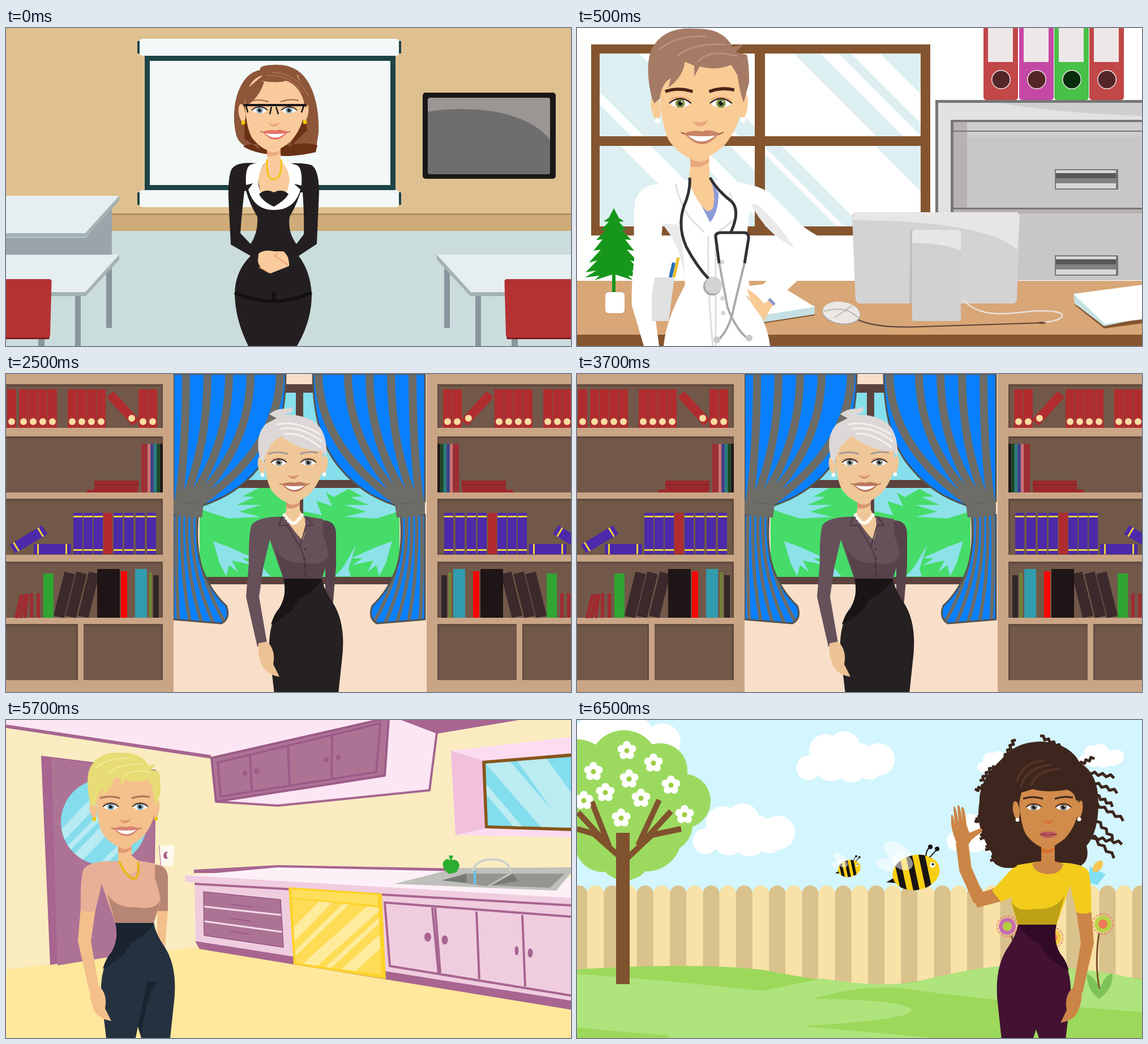
Recreate the animation shown at these times as an HTML page. Size 998 by 561 pixels, loop 8 s.

```html
<!DOCTYPE html>
<html lang="en">
<meta charset="utf-8">
<title>Five characters</title>
<style>
html, body { margin: 0; height: 100%; overflow: hidden; }
svg { display: block; width: 100vw; height: 100vh; }
</style>
<svg id="stage" viewBox="0 0 998 561" preserveAspectRatio="none"></svg>
<script>
const each = (list, f) => list.map(f).join('');
const times = (n, f) => each([...Array(n).keys()], f);
const O = (fill, x, y, rx, ry = rx, turn = 0) => `<ellipse fill="${fill}" cx="${x}" cy="${y}" rx="${rx}" ry="${ry}" transform="rotate(${turn} ${x} ${y})"/>`;
const move = (how, s) => `<g transform="${how}">${s}</g>`;
const flip = (axis, s) => move(`matrix(-1 0 0 1 ${axis} 0)`, s);
let clips = 0;
const clip = (d, s) => `<clipPath id="c${++clips}"><path d="${d}"/></clipPath><g clip-path="url(#c${clips})">${s}</g>`;

// One shape per line: "color path", "color/width path", r = rect, o = ellipse, d = dots of one radius.
function shape(line) {
  if (line[0] === '<') return line;
  const [color, ...rest] = line.split(' '), [fill, width] = color.split('/'), [kind, ...n] = rest;
  if (kind === 'o') return O(fill, ...n);
  if (kind === 'd') return each(n.slice(1), (x, i, a) => i % 2 ? '' : O(fill, x, a[i + 1], n[0]));
  if (kind === 'r') return `<rect fill="${fill}" x="${n[0]}" y="${n[1]}" width="${n[2]}" height="${n[3]}" rx="${n[4] || 0}"/>`;
  const style = width ? `fill="none" stroke="${fill}" stroke-width="${width}" stroke-linejoin="round"` : `fill="${fill}" fill-rule="evenodd"`;
  return `<path ${style} d="${rest.join(' ')}"/>`;
}
const paint = s => each(s.split('\n').filter(Boolean), shape);

const eye = (x, y, iris) => clip(`M${x - 14} ${y}q14 -11 28 0q-14 11 -28 0`, paint(`
#fff r ${x - 14} ${y - 6} 28 12
${iris} o ${x} ${y} 6
#17191c o ${x} ${y} 3
#fff o ${x + 2} ${y - 2} 1`)) + paint(`#33221f/1.7 M${x - 14} ${y}q14 -12 28 0`);

const head = (skin, shade, lip, iris, brow, ring, browWidth = 3, shut) => paint(`
${skin} M198 205h24v46h-24Z
${shade} M198 223q12 9 24 0v5q-12 9 -24 5Z
${skin} o 154 158 6 16 -8
${skin} o 266 157 5 16 8
${ring} d 3.5 156 175 265 174
${skin} M159 135Q166 95 193 91H252Q262 110 264 150Q263 182 240 208Q217 226 207 226Q187 222 171 201Q160 180 159 135Z
${brow}/${browWidth} M166 138q16 -6 35 0M222 138q16 -6 32 -2
${shade}/1.5 M172 148q13 -6 26 1M224 148q13 -6 26 1
${eye(185, 153, iris)}
${eye(237, 153, iris)}
${shade} M200 175q11 5 21 -1q-5 9 -10 8q-6 1 -11 -7Z
${shut ? paint(`
${lip} M195 200q10 -7 15 -3q6 -4 16 3q-5 7 -16 7q-11 0 -15 -7Z
#8d3942/1.3 M195 200q15 3 31 0`) : paint(`
#8b4b35/1.3 M186 190q27 13 54 0
${lip} M190 191q15 -5 23 -2q7 -4 22 2q-22 28 -45 0Z
#fff M195 194q18 2 35 0q-18 15 -35 0Z`)}`);

const shortHair = (dark, light) => paint(`
${dark} M149 147Q139 104 149 83Q165 54 206 58Q239 57 252 81L265 78L256 88L270 91Q273 103 273 126L266 152Q261 139 258 117L250 104Q231 112 210 106L203 119V105L191 100Q189 119 170 133L173 121Q161 128 159 147L152 153Z
${light}/2 M158 85Q180 65 219 68M181 93Q201 76 243 78M207 101Q220 83 258 93`);

const hand = 'M149 472L164 469Q180 483 175 509L186 531Q159 527 153 505Q147 490 149 472Z';
const figure = (skin, top, dark, low, lowDark, long, back = true) => paint(`
${back ? paint(`
${dark} M262 255Q288 255 286 284V337H264Z
${long ? dark : skin} M267 337H286L280 409L267 391Z`) : ''}
${long ? top : skin} M132 330L158 334L150 390L164 471L147 478L127 390Z
${top} M198 249Q150 247 137 263Q131 278 132 336Q145 341 158 336L169 289Q181 325 193 358H261L273 320Q270 295 263 280V253L227 247Z
${dark} M179 307Q195 333 229 330Q263 337 273 317L261 358H193Z
${low} M193 358H261Q264 377 280 400Q305 438 296 505L290 561H177L168 485Q166 440 186 410Q200 387 193 358Z
${lowDark} M194 358H261Q250 379 219 395Q211 419 171 439Q177 419 186 410Q200 387 194 358Z
${skin} ${hand}`);

function classroom() {
  const table = y => paint(`
#e6eef2 M-40 ${y}H200l-60 66H-40Z
#a4b2b3 M-40 ${y + 66}H140l60 -66v9l-59 64H-40Z`);
  const seat = paint(`
#87959c r 122 473 10 88
#87959c r 177 422 10 107
${table(400)}
#87959c r 57 546 11 15
#7e1c20 M-40 540H78L76 549H-40Z
#b53233 M-40 443H76Q81 443 80.500 448L78 541Q78 546 73 546H-40Z`);
  const roll = y => paint(`
#1d4347 r 232 ${y + 4} 466 22
#f2f9f8 r 236 ${y} 458 30 5`);
  return paint(`
#dfc091 r 0 0 998 561
#cfab79 r 0 328 998 30
#a47c50 r 187 327.5 811 2
#cbdcdc r 0 358 998 203
#1d4347 r 245 45 443 243
#f2f9f8 r 254 58 425 219
${roll(19)}
${roll(286)}
#191818 r 736 114 235 152 5
#6f6e6e r 745 123 216 135 4
#9b9594 M748 123H958L961 126V197C932 160 872 143 805 143Q770 143 745 148V126Z
#99a5ab M0 370H141L187 317V400H0Z
${table(296)}
${seat}
${flip(961, seat)}
#8d5639 M449 74Q446 66 472 65Q500 63 519 78C546 100 554 150 552 185L547 219Q500 229 478 224C440 222 412 208 407 190C400 165 402 130 412 108Q425 78 449 74Z
#6a3114 M419 209Q430 202 460 207H500Q530 200 550 207L547 219Q500 229 478 224Q440 222 419 209ZM421 140V195L448 214ZM526 140L532 180L500 212Z
${move('translate(263 -8)', head('#f9cb9c', '#efaa7f', '#e77365', '#82a7b4', '#a2673d', '#f7c600', 2))}
#8d5639 M450 93Q480 98 495 93Q522 103 529 141L538 130L512 80H458L420 112L424 138Q448 122 456 95Z
#a96c4b/2 M459 84Q500 80 524 114M470 78Q512 80 534 119
#171516/4 M420 136H530
#171516/2.5 M424 137l3 12M469 139l-3 13M477 139l4 13M526 137l-4 12
#231f20 M432 238Q405 237 398 250Q392 265 393 300L397 382L432 402Q404 430 404 470Q405 515 428 561H514Q540 517 540 470Q538 430 517 402L549 381L553 290Q553 251 540 242Q525 237 500 239H449ZM421 288Q416 330 414 362L432 381Q446 360 444 333Q430 310 424 287ZM524 290Q527 330 526 364L513 381Q497 360 501 333Q514 310 520 290Z
#f9cb9c M462 230H484L502 250L500 296H450L444 260Z
#fff M461 233L432 241Q422 246 424 277L436 274L428 285Q438 321 473 321Q510 321 520 285L509 275L522 278Q524 247 514 242L486 234Q504 255 500 275Q494 304 473 315Q452 305 446 278Q443 254 461 233Z
#231f20 M447 293Q459 282 473 290Q488 282 499 293Q492 305 473 315Q453 306 447 293Z
#f3c512/3 M461 232Q459 267 473 267Q488 266 486 232
#121011/6 M404 467Q470 497 540 467M473 467v12
#f9cb9c M446 398Q456 390 474 394H490Q501 403 500 420L467 433Q447 426 445 411Z
#ee9c6e/1.8 M475 402l23 16M447 422l15 8M480 397l-6 6`);
}

function clinic() {
  const pane = (x, y, w, h, bands) => paint(`
#fff r ${x} ${y} ${w} ${h}
${clip(`M${x} ${y}h${w}v${h}h${-w}Z`, each(bands, ([a, b]) => paint(`#ddeff1 M${x + a} ${y}h${b - a}l200 200h${a - b}Z`)))}`);
  const binder = (x, color, hole) => paint(`
${color} r ${x} -6 61 133 5
#ede7e8 r ${x + 8} 0 44 60
#ede7e8 o ${x + 31} 91 17
${hole} o ${x + 31} 91 15.5`);
  const handle = y => paint(`
#767676 r 844 ${y} 112 36
#d8d8d8 r 846 ${y + 2} 106 32
#5b5656 r 846 ${y + 7} 106 9
#858282 r 846 ${y + 16} 106 9`);
  const branch = paint('#17961c M65 318L56 335L47 341L56 342L42 357L51 356L34 374L45 373L29 393L42 391L21 414L36 410L15 431L34 428L14 440L40 437L31 445L62 435V466H65Z');
  return paint(`
#fff r 0 0 998 561
#84552f r 25 29 599 337
${pane(40, 45, 274, 146, [[-145, -90], [-68, 70], [100, 145]])}
${pane(332, 45, 275, 146, [[51, 98], [130, 152], [203, 290]])}
${pane(40, 208, 274, 142, [[-140, 37], [90, 150], [180, 230]])}
${pane(332, 208, 275, 142, [[-75, -15], [-2, 30], [195, 275]])}
#d8a677 r 0 446 998 95
#84552f r 0 541 998 20
#777 r 633 127 365 318
#e3e1e1 r 638 132 360 313
#cfcfcf M745 132H998V155Q850 150 745 132Z
#777 r 660 162 338 283
#b9b1b1 r 665 166 333 279
#d0cfcf M689 166H998V445H689Z
#777 r 665 181 333 2
#c7c7c7 r 689 192 309 253
#777 r 665 317 333 3
#b9b1b1 r 665 320 333 7
${handle(249)}
${handle(401)}
${binder(718, '#c24747', '#542628')}
${binder(781, '#c548a6', '#542628')}
${binder(843, '#48c148', '#082d0c')}
${binder(905, '#c24747', '#542628')}
#d3d3d4 M490 325H777L782 330L777 482L772 486H497L492 481L486 330Z
#e7e6e6 M490 325H777L782 330L778 391Q720 340 487 339Z
#bdbdbe M589 356H596V486H587Z
#d0d0d1 r 592 356 86 161 4
#e7e6e6 M595 356H675L678 359V393Q650 380 592 379V359Z
#e5e1de/2.5 M679 476C715 520 775 499 820 499Q861 499 857 509Q850 518 820 519
#584337/2 M497 515Q530 530 605 527L825 520
#715033 o 821 520 7 2
#aaa5a2 o 467 503 34 20 8
#ebe7e4 o 467 502 33 19 8
#aaa/1.5 M436 500Q475 488 497 512M455 511L487 489
#84552f M877 487L931 530L998 521V510H925Z
#c5e0e3 M877 468L998 500V512L931 526L879 486Z
#fff M877 469L998 453V514L932 522Z
#84552f M328 517L420 502V507L330 521Z
#c5e0e3 M420 490V505L330 519L310 505Z
#fff M290 457L350 449L420 492L325 507Z
${branch}
${flip(130, branch)}
#fff r 50 466 34 37 6
${move('translate(-74 -79) scale(1.385)', head('#f9cb95', '#e9a77d', '#c98468', '#7c913d', '#4a2418', '#fff', 4) + shortHair('#a67b66', '#bb927c'))}
#fff M203 267L150 275Q108 275 102 310Q99 350 102 400Q95 455 97 490L118 561H145L133 470Q148 400 151 345L178 347Q197 410 190 455Q157 515 153 561H341Q335 510 300 475L306 461L295 400L307 310Q350 364 384 387L321 462L345 487L389 446L424 366Q385 345 330 285Q305 272 240 268Z
#eaeaea M307 310L320 312Q355 345 384 387Q335 365 307 310ZM152 347L179 347Q189 380 190 445Q185 395 165 365Z
#2370b7/6 M165 440L171 414
#e8bd27/5 M171 440L179 405
#dfe1e2 M137 440H172L162 517H132V472Z
#f9cb95 M300 460Q318 470 330 486L344 478L350 486Q337 498 332 517Q316 498 308 485Z
#8796d0/5 M339 478L349 488
#8b9cda M198 270L235 343Q250 325 250 292L236 265Z
#f9cb95 M200 245H234V262Q247 295 240 318Q234 325 228 322Q210 305 197 270Z
#dedede/3 M174 275Q180 305 199 335L224 360M270 290L281 336L241 366M232 367Q230 460 240 561M245 369V561
#d6d6d6 d 4 256 413 257 477 258 503
#313136/5 M199 264Q201 286 189 314Q177 350 193 386Q211 420 233 443M235 264Q248 287 273 306Q289 322 272 360
#aaa/4 M251 414L266 493Q280 530 299 546M296 414L277 493Q270 530 250 550
#313136/5 M251 415L245 369Q244 361 255 361H295Q304 361 303 372L296 415
#a5a5a5 o 239 456 16
#d3d3d3 o 241 454 15
#c9c9c9 d 6 247 550 304 547`);
}

function library() {
  const red = (x, y = 27) => paint(`
#b12c2e r ${x} ${y} 16 68
#f8dda1 o ${x + 8} ${y + 57} 6`);
  const blue = x => paint(`
#4c2aa9 r ${x} 245 16 73
#efd438 r ${x} 250 16 3
#efd438 r ${x} 309 16 3`);
  const lying = how => move(how, paint(`
#4c2aa9 r 0 0 66 18
#efd438 r 6 0 3 18
#efd438 r 56 0 3 18`));
  const lean = (x, y, turn, w, h, color) => move(`translate(${x} ${y}) rotate(${turn})`, paint(`${color} r 0 ${-h} ${w} ${h}`));
  const space = (x, y, w, h) => paint(`
#624b3e r ${x} ${y} ${w} ${h}
#715849 r ${x} ${y + 4} ${w - 3} ${h - 4}`);
  const shelf = paint(`
#c9a586 r -50 0 346 561
${space(-50, 18, 327, 77)}
${each([110, 220, 331], y => space(-50, y, 327, 99))}
${space(-50, 441, 177, 99)}
${space(137, 441, 140, 99)}
${each([2, 23, 40, 57, 74, 109, 126, 143, 160, 234, 251], x => red(x))}
${move('translate(178 41) rotate(-42)', red(0, 0))}
${each(['#a12c32', '#a12c32', '#c97175', '#3b408e', '#267f82', '#174926', '#201919'], (c, i) => paint(`${c} r ${239 + i * 5.500} 123 5 86`))}
#9c282c r 156 188 78 16
#711d23 r 156 195 78 1
#9c282c r 143 204 90 5
${each([119, 137, 155, 190, 209, 229, 249], blue)}
#b12c2e r 172 245 16 73
${lying('translate(49 300)')}
${lying('translate(7 301) rotate(-31)')}
${each([[15, 13], [22, 13], [30, 7], [42, 0], [54, 0]], ([x, a]) => lean(x, 430, a, 6, 43, '#a02b30'))}
#31a532 r 66 352 18 78
${each([84, 105, 127], x => lean(x, 426, 14, 19, 80, '#3b292b'))}
#201516 r 161 344 40 86
#f50705 r 203 348 11 82
#319cad r 228 344 21 86
#738038 r 252 350 6 80
#312629 r 260 355 10 75`);
  const high = 'M296 0H494Q493 115 444 168Q407 213 347 232L296 225Z', low = 'M296 248H339Q334 308 347 345Q362 384 389 409Q397 431 381 440L296 433Z';
  const curtain = paint(`
#087fff ${high}
${clip(high, each([318, 356, 394, 432, 484], x => paint(`#6d6c66/14 M${x} -2Q${x} 130 ${300 + (x - 296) * .2} 230`)))}
#54534f/3 ${high}
#087fff ${low}
${clip(low, times(5, i => paint(`#6d6c66/6 M${302 + i * 9} 248Q${299 + i * 8} 345 ${305 + i * 21} 443`)))}
#54534f/3 ${low}
#6d6c66 M296 221Q320 230 349 230L346 253Q317 253 296 247Z`);
  const leaf = paint('#8ce2e8 M340 237L361 229L374 215L365 200H448L418 216L439 217L408 231L450 231L412 243L450 252L394 255L365 246ZM366 295L404 309L391 304L438 325L418 325L436 337L399 329L410 350L394 337L389 357L377 333ZM430 302L452 340L467 357H439L443 344Z');
  return paint(`
#f9dfca r 0 0 998 561
#5c433e r 342 18 353 353
#86dfec r 342 33 353 325
#46dc69 r 342 201 353 157
${leaf}
${flip(1048, leaf)}
#8ce2e8 M525 201H608L579 217L565 209L576 233L548 224L558 249L525 242Z
#5c433e M512 18h13v340h-13ZM342 187h353v14h-353ZM342 358h353v13h-353Z
${curtain}
${flip(1036, curtain)}
${shelf}
${flip(1039, shelf)}
${move('translate(297 3)', head('#f0c798', '#d99572', '#bc765e', '#89948f', '#a69b99', '#fff') + figure('#ecc294', '#66505a', '#57424c', '#252021', '#191516', true))}
#f0c798 M495 240H519L528 255Q531 276 524 293Q509 280 491 249Z
#4d3842/2 M488 251L482 267H497L519 305L530 267H542L531 251M519 305Q530 325 529 362
#3f2d36 d 1.6 528 309 528 325 528 340 528 355
${times(9, i => O('#fff9ee', 492 + i * 3.800, 249 + 14 * Math.sin(Math.PI * i / 8), 3.300))}
#ddd8d7 M449 150Q438 110 459 88L478 78L465 71Q477 60 496 61L507 58L505 67L492 72Q522 70 546 85Q568 103 566 145L558 136Q521 136 486 110Q466 121 458 144L455 158Z
#f5f0ed/3 M479 89Q514 81 556 107M485 97Q519 90 558 119M492 106Q519 101 556 130`);
}

function kitchen() {
  const glass = (d, base, light, lines) => paint(`
${base} ${d}
${clip(d, each(lines, ([x, y, len, w]) => paint(`${light}/${w} M${x} ${y}l${len}`)))}`);
  return paint(`
#faecc0 r 0 0 998 561
#ffe89b M0 440L341 401L998 505V561H0Z
#fde6f4 M0 0H700L362 64L0 11Z
#a76590/6 M0 11L362 65
#a76590 M698 0L762 24L906 0Z
#fde6f4 M675 -3H698L760 22L748 124L480 151L371 144L669 98Z
#a76590/4 M698 -2L761 22L748 124L480 151L371 144
#ad7395 M362 66L678 -6L669 98L371 144Z
#9c5b88/4 M363 67L676 -4L669 98L371 144ZM374 75L661 6L654 92L379 135ZM431 60l3 67M498 44l3 73M576 25l-1 81
#9c5b88 d 4.5 422 94 443 90 566 70 587 66
#a76590 M62 63L265 88L261 405L78 432Z
#ad7395 M80 67L262 92L258 406L91 433Z
${glass('M97 180a76 76 0 1 1 152 0a76 76 0 1 1 -152 0Z', '#84dced', '#b7eaf1', [[92, 211, '116 -121', 17], [97, 240, '138 -139', 9], [115, 255, '135 -139', 18], [165, 260, '94 -94', 9]])}
#fff9ed M270 222L298 220L295 258L273 256Z
#a76590 M286 232Q277 232 278 241Q280 247 286 244Q281 238 286 232ZM270 222h1l3 34h-1Z
#fbdcf0 M786 54L998 30V207L794 203Z
#f1c0dd M786 54L844 72L848 191L794 203Z
#87551b M841 72L998 59V196L846 191Z
${glass('M847 77L998 65V190L851 186Z', '#82dded', '#baecf1', [[860, 65, '122 140', 35], [845, 118, '65 77', 12], [916, 52, '124 173', 45]])}
#a76590 M332 264L480 256L802 262V270H332Z
#fdf0f7 M316 275L480 260L802 267L998 277V315Z
#f0cde0 M316 274L998 314V330L316 285Z
#efcddf M333 287L998 329V497L335 391Z
#a76590 M334 390L998 495V511L342 404ZM333 287L998 325V329L333 291Z
#ad7395 M349 303L485 317L490 401L350 380Z
#f8ddeb/3 M349 329L486 344M350 355L489 374
#965681/1.5 M396 325l38 4M396 350l37 5M396 373l34 5M349 303L485 317L490 401L350 380Z
#fdd32a M499 295L664 306L671 457L508 431Z
#ffe05d M504 299L657 309V327L505 313Z
${glass('M505 315L658 331L663 450L512 428Z', '#ffdc55', '#ffeb9c', [[502, 385, '80 -82', 18], [500, 422, '125 -121', 8], [522, 445, '140 -124', 20], [560, 445, '114 -105', 8], [595, 450, '80 -72', 19]])}
#a76590/4 M998 347L669 322L678 434L998 486M753 331L764 447M758 331L767 446M831 338L836 457M912 344L917 470
#a76590 o 745 383 6 8
#a76590 o 775 388 5.5 8
#a76590 o 902 407 3.5 8
#a76590 o 926 411 4.5 8
#bfc0bb M686 289L797 261L998 260V270L972 301Z
#959690 M770 283L813 271H887L849 293ZM857 292L895 271H987L961 296Z
#777973 M813 271L814 287L770 283ZM895 271L905 284L857 292Z
#cfd0cb/4 M825 266Q830 246 858 246Q888 246 891 267
#62c4ee r 826 266 4 24
#2cad31 M785 248Q778 242 772 251Q770 261 779 269Q783 273 788 270Q797 272 801 257Q799 244 787 247L790 239H782Z
${head('#f4c18d', '#e09a72', '#d58272', '#76a8b8', '#a97352', '#f1c500')}
${figure('#f3bf8b', '#e8b097', '#b78573', '#263140', '#1a2431')}
#1a2431 M250 460L269 462Q250 474 238 561L233 541Z
#ffe89b M229 561L233 541L239 561Z
#f4c18d M199 240H223L236 251Q229 272 218 271Q200 270 198 248Z
#e6b818/4 M200 249Q211 276 225 280Q237 280 233 250
${shortHair('#e7dc75', '#f4eb9a')}`);
}

function garden() {
  const cloud = (x, y, s) => move(`translate(${x} ${y}) scale(${s})`, paint(`
#fff d 22 20 65 112 43 130 64
#fff d 29 50 34 84 29 145 50 96 62 60 60`));
  const flower = ([x, y]) => times(5, i => O('#fff', x + 10 * Math.sin(i * 1.257), y - 10 * Math.cos(i * 1.257), 7)) + paint(`
#fff o ${x} ${y} 8
#9fcb43 o ${x} ${y} 4.5`);
  const bee = (x, y, s) => move(`translate(${x} ${y}) scale(${s}) rotate(-12)`, paint(`
#191414 M-40 1L-55 6L-38 11Z
#fff9 o -22 -37 16 33 -40
#fff8 o -38 -20 12 30 -65
#f9cf13 o 0 0 42 31
${clip('M-42 0a42 31 0 1 1 84 0a42 31 0 1 1 -84 0Z', paint('#191414/11 M-28 -35v70M-6 -35v70M16 -35v70'))}
#fff8 o -20 -24 14 20 -50
#fff o 31 -7 5
#171111 o 32 -8 2
#171111/2 M23 -25Q26 -36 34 -39M29 -21L44 -32
#171111 d 4 34 -39 45 -33`));
  const bloom = (x, y, color, mid) => `<circle cx="${x}" cy="${y}" r="18" fill="none" stroke="#ef7863" stroke-width="1.5" stroke-dasharray="5 2"/>` + O(color, x, y, 15) + O(mid, x, y, 8);
  const strand = ([x, y, a, b]) => {
    const len = Math.hypot(a, b);
    const knots = times(8, i => {
      const u = (i + 1) / 8, w = (i % 2 ? 2.500 : -2.500) / len;
      return `L${x + a * u - b * w} ${y + b * u + a * w}`;
    });
    return paint(`#3d261d/5 M${x} ${y}${knots}`);
  };
  return paint(`
#d3f5fe r 0 0 998 561
#fff o 65 23 70 38
#fff o 151 38 32
${cloud(389, 20, .99)}
${cloud(206, 147, 1.030)}
${cloud(655, 162, .8)}
${cloud(886, 42, .46)}
${cloud(708, 55, .43)}
${times(35, i => paint(`${i % 2 ? '#f8e2a7' : '#dac28d'} r ${-11 + i * 29.170} 292 29.3 250 14.5`))}
#9cd95b M0 440Q210 427 330 441Q480 471 565 466Q625 459 685 443Q775 425 998 457V561H0Z
#afe37c M0 448Q160 459 326 478L433 456Q520 471 590 464Q680 441 740 435Q870 428 998 459V561H0Z
#9cd95b M415 492Q505 465 580 474Q720 495 998 515V561H630Q510 550 397 540Q600 528 590 510Q573 493 415 492ZM0 542Q80 551 162 556L159 561H0Z
#9cda5f d 62 0 96 83 80 123 205 5 153 80 150
#9cda5f d 48 147 89 188 143 85 235 45 220 156 185
#80522e/10 M82 247L30 201L0 192M46 211L2 163M57 223L26 144M82 250L132 203L184 192M108 221L145 141M122 209L166 161
#80522e r 69 199 24 267
${each([[88, 54], [29, 91], [135, 76], [92, 104], [166, 115], [50, 128], [12, 142], [113, 138], [78, 173], [190, 167]], flower)}
${bee(599, 269, 1)}
${bee(481, 262, .48)}
#78502c/3 M767 380Q786 430 782 463M922 376Q914 431 923 475
#7dc458 M922 492Q900 475 901 448Q920 457 923 479Q929 451 946 447Q947 475 922 492ZM744 449L756 471L744 464Z
${bloom(760, 364, '#c96daf', '#b4cf40')}
${bloom(929, 360, '#b9d247', '#f07959')}
${bloom(840, 384, '#f2c746', '#ef775f')}
#80dff2 M906 259L934 272L919 291L902 286Z
#f4c756 o 920 258 7 12 40
#3d261d M751 68Q775 37 825 38Q871 43 888 75Q921 94 921 146Q921 198 900 222Q908 254 880 261H757Q730 257 733 235Q702 189 711 144Q709 107 751 68Z
${each([[756, 66, 17, -32], [816, 43, 39, 4], [835, 49, 37, 12], [878, 83, 35, -17], [893, 91, 56, 9], [900, 106, 55, 21], [905, 126, 42, 25], [910, 144, 56, 32], [908, 166, 40, 44], [896, 194, 54, 48], [907, 206, 56, 11], [736, 80, -23, 28], [730, 111, -26, 13], [719, 163, -15, 17], [724, 179, -10, 32], [735, 206, -12, 24], [748, 221, -16, 28], [818, 28, 37, 20]], strand)}
${move('translate(622 1)', head('#d18b4b', '#d9722f', '#bd5860', '#867d73', '#38241d', '#fff', 3, true))}
#3d261d M775 132Q765 98 795 76Q825 55 864 81Q886 97 889 142H881Q880 128 866 123Q830 129 805 122L785 128L780 151Z
#553326/4 M777 109Q786 74 827 71M784 119Q791 84 838 79M801 116Q812 88 854 86
#cb8546/22 M680 216L686 263L711 319
#cb8546 M669 213Q659 190 661 168Q664 163 667 184L665 153Q669 147 674 183L672 151Q677 145 681 181L679 155Q684 146 688 185L693 199L713 191Q719 193 714 198L697 211L690 222H672ZM698 310L707 331L749 320L739 296Z
${move('matrix(-1 0 0 1 1040 3)', figure('#cb8546', '#f3cb1b', '#bea016', '#431232', '#300a26', false, false))}
#f3cb1b M803 253Q777 253 765 266L733 301L749 321L777 309L785 283Z
#cb8546 M820 240H844V249L859 254Q855 272 832 272Q807 270 804 253L820 249Z
#9cd95b M806 561L811 546L816 561Z`);
}

const stage = document.getElementById('stage'), starts = [0, 500, 2500, 4500, 6500];
stage.innerHTML = each([classroom, clinic, library, kitchen, garden], draw => `<g>${draw()}</g>`);

function show() {
  const t = performance.now() % 8000, now = starts.filter(s => s <= t).length - 1;
  [...stage.children].forEach((g, i) => g.style.display = i === now ? '' : 'none');
  requestAnimationFrame(show);
}
show();
</script>
</html>
```
